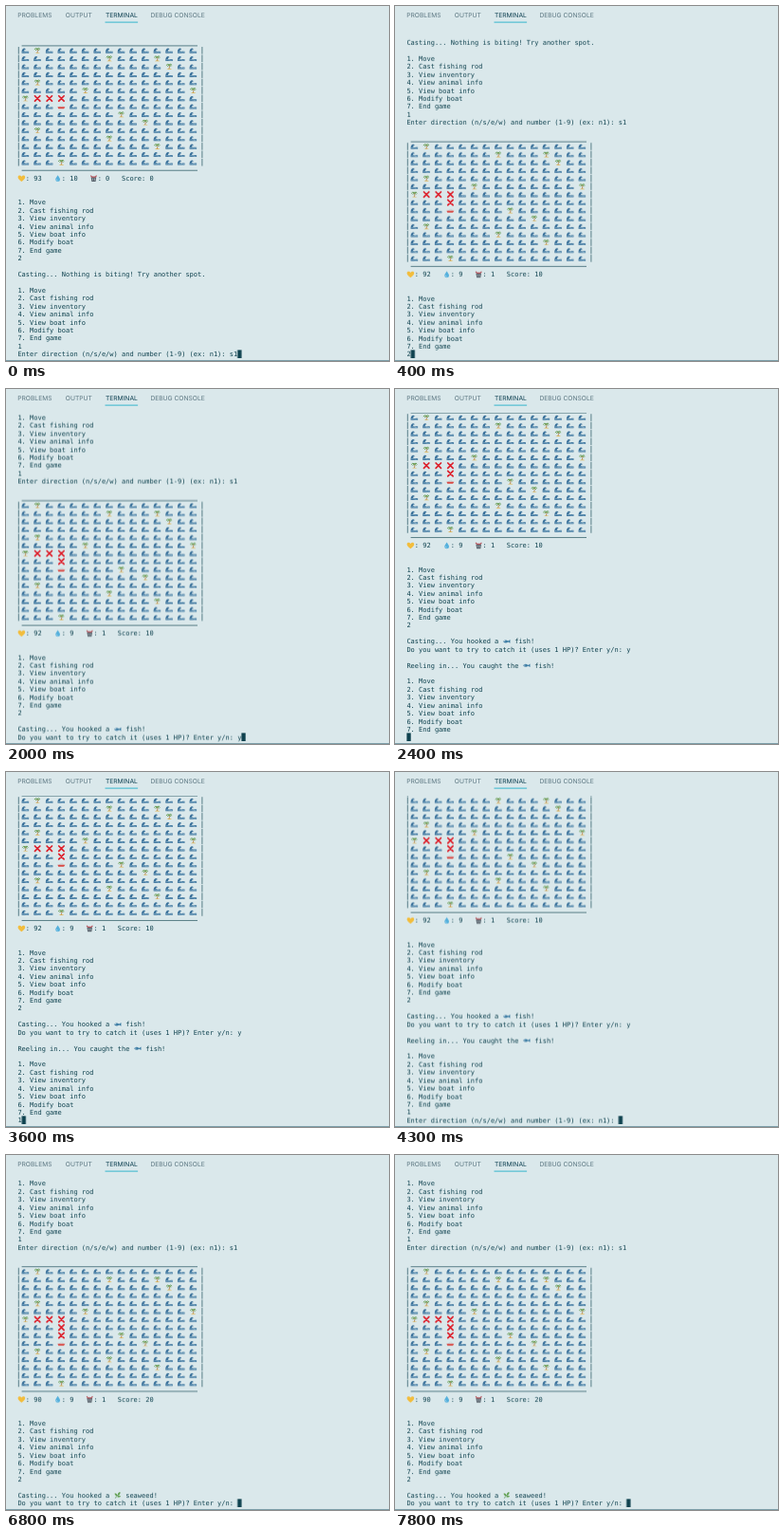
These frames come from a looping animation (404 px wide and 374 px high, 8000 ms). An HTML page:

```html
<!DOCTYPE html>
<html lang="en">
<head>
<meta charset="utf-8">
<title>Fishing game in a terminal</title>
<style>
  html, body { margin: 0; width: 100%; height: 100%; overflow: hidden; background: #dae8eb; }
  svg { display: block; }
  text { white-space: pre; text-rendering: geometricPrecision; }
  .tabs { font: 6.7px Inter, sans-serif; fill: #5c7782; }
  .tabs .on { fill: #0c3f50; }
  .term { font: 7px "DejaVu Sans Mono", monospace; fill: #0f424f; }
  .rule { stroke: #2b5965; stroke-width: .75; fill: none; }
</style>
</head>
<body>
<svg id="stage" width="404" height="374" viewBox="0 0 404 374">
  <defs>
    <clipPath id="view"><rect y="25.6" width="404" height="346"/></clipPath>
    <g id="wave">
      <path d="M.4 7V5.2C.6 3.2 1.5 1.9 3 1.9C4.2 1.9 4.7 2.8 4.1 3.5C3.3 3 2.6 3.8 3 4.6C3.7 5.5 5.8 5.1 7.9 5V7Z" fill="#39709a"/>
      <path d="M1 5.9Q2.5 5.2 4.2 6T7.6 5.8" fill="none" stroke="#a9cfe0" stroke-width=".6"/>
    </g>
    <g id="isle">
      <path d="M1.6 7.2Q4.4 5.4 7.2 7.2Z" fill="#e2b755"/>
      <path d="M4 6.6Q5.1 5 4.3 2.6" fill="none" stroke="#a9773c" stroke-width=".8"/>
      <path d="M4.3 2.5Q2.4 1 1 3.2M4.3 2.5Q6 .8 7.2 3M4.3 2.5Q3 2.8 2.6 4.3M4.3 2.5Q5.8 2.8 6 4.2" fill="none" stroke="#639a4e" stroke-width="1"/>
    </g>
    <path id="cross" d="M1.6 1.6L7 7M7 1.6L1.6 7" stroke="#dd1f2b" stroke-width="1.7" stroke-linecap="round"/>
    <g id="boat">
      <path d="M2.4 4.6L3.6 3.2H5.6L6.2 4.6Z" fill="#f3f5f5" stroke="#90a7b0" stroke-width=".3"/>
      <path d="M.3 4.6H8.2L7 6.6H1.1Z" fill="#d94a45"/>
    </g>
    <path id="heart" d="M4.2 7.6C1.8 5.9.4 4.5.4 2.9C.4 1 3 .6 4.2 2.4C5.4 .6 8 1 8 2.9C8 4.5 6.6 5.9 4.2 7.6Z" fill="#f2bd3d"/>
    <g id="drop">
      <path d="M4.3 .8C5.4 2.8 6.7 4 6.7 5.4A2.4 2.3 0 0 1 1.9 5.4C1.9 4 3.2 2.8 4.3 .8Z" fill="#55b0dc"/>
      <path d="M3.1 5.2Q3.2 6.4 4.2 6.7" fill="none" stroke="#d3eef8" stroke-width=".6"/>
    </g>
    <g id="pail">
      <path d="M1.4 3H7L6.3 7.6H2.1Z" fill="#56606a"/>
      <path d="M1 1.2L2.6 2.8H5.8L7.4 1.2" fill="none" stroke="#b5525a" stroke-width="1.1"/>
      <path d="M3.2 4V6.6M5.2 4V6.6" stroke="#c9d4d8" stroke-width=".6"/>
    </g>
    <g id="fish">
      <path d="M.5 4.3Q3 1.6 5.8 4L7.9 2.5V6.2L5.8 4.9Q3 7 .5 4.3Z" fill="#3f7ea5"/>
      <circle cx="2.2" cy="4" r=".5" fill="#f2f7f8"/>
    </g>
    <g id="weed">
      <path d="M1.4 7.4Q4 5.5 6.4 1.2" fill="none" stroke="#3f7f3c" stroke-width=".7"/>
      <path d="M4 5Q.8 5 1.2 2.2Q4 2.4 4 5ZM4.4 4.6Q4 1.4 6.8 .8Q7.6 3.4 4.4 4.6ZM3.6 5.8Q5.4 3.8 7.6 5.4Q6 7.4 3.6 5.8Z" fill="#5d9e4c"/>
    </g>
  </defs>
  <g class="tabs">
    <text x="12.3" y="12.4">PROBLEMS</text>
    <text x="62.8" y="12.4">OUTPUT</text>
    <text x="104.9" y="12.4" class="on">TERMINAL</text>
    <text x="152.4" y="12.4">DEBUG CONSOLE</text>
    <rect x="104.5" y="16.6" width="34.6" height="1" fill="#35b5cc"/>
  </g>
  <g clip-path="url(#view)"><g id="log" class="term"></g></g>
  <rect id="cursor" x="12.4" y="362.4" width="4.3" height="8.6" fill="#0f424f"/>
  <rect y="373" width="404" height="1" fill="#7c9ea8"/>
</svg>
<script>
const LOOP = 8000, CW = 4.214, LH = 8.42, LEFT = 12.4, LAST = 362.6;
const log = document.getElementById('log');
const cursor = document.getElementById('cursor');
const scroll = [], caret = [];
let row = 0, col = 0;

function add(tag, attrs) {
  const el = document.createElementNS('http://www.w3.org/2000/svg', tag);
  for (const k in attrs) el.setAttribute(k, attrs[k]);
  return log.appendChild(el);
}

const key = (t, props) => ({ offset: t / LOOP, easing: 'step-end', ...props });

function loop(el, keys) {
  const end = { ...keys[keys.length - 1], offset: 1 };
  el.animate([...keys, end], { duration: LOOP, iterations: Infinity });
}

function write(text) {
  const el = add('text', { x: LEFT + col * CW, y: row * LH + 6.7 });
  el.textContent = text;
  col += text.length;
  return el;
}

function icon(id, dx = 0) {
  add('use', { href: '#' + id, x: LEFT + col * CW + dx, y: row * LH });
  col += 2;
}

function newline(n = 1) { row += n; col = 0; }
function line(text) { write(text); newline(); }
function rule(d) { add('path', { d, class: 'rule' }); }

// The current row becomes the bottom row of the view at time t.
function show(t) {
  scroll.push(key(t, { transform: `translate(0px, ${LAST - row * LH}px)` }));
  moveCaret(t);
}
function moveCaret(t) {
  caret.push(key(t, { transform: `translate(${col * CW}px, 0px)` }));
}
function type(ch, t) {
  const el = write(ch);
  loop(el, [key(0, { opacity: 0 }), key(t, { opacity: 1 })]);
  moveCaret(t);
}

// Columns of islands in each row of the sea
const isles = [[1], [7, 11], [12], [], [1], [5, 14], [0], [], [8], [10], [1], [7], [11], [], [3]];

function cell(x, y, boat) {
  if (isles[y].includes(x)) return 'isle';
  if (x === 3 && y === boat) return 'boat';
  if (y === 6 && x > 0 && x < 4) return 'cross';
  if (x === 3 && y > 6 && y < boat) return 'cross';
  return 'wave';
}

function board(boat, hp, water, catches, score) {
  rule(`M16.6 ${row * LH + 7.7}H202`);
  newline();
  for (let y = 0; y < 15; y++) {
    const top = row * LH;
    rule(`M13.3 ${top + .4}v7.6M206.9 ${top + .4}v7.6`);
    for (let x = 0; x < 15; x++) {
      col = 1 + 3 * x;
      icon(cell(x, y, boat), -.4);
    }
    newline();
  }
  rule(`M16.6 ${row * LH + 4.3}H202`);
  newline();
  icon('heart', -.2);
  write(`: ${hp}   `);
  icon('drop');
  write(`: ${water}   `);
  icon('pail');
  write(`: ${catches}   Score: ${score}`);
  newline(3);
}

function menu() {
  ['Move', 'Cast fishing rod', 'View inventory', 'View animal info',
   'View boat info', 'Modify boat', 'End game']
    .forEach((item, i) => line(`${i + 1}. ${item}`));
}

function found(text, id, name) {
  write(text);
  icon(id);
  line(` ${name}!`);
}

const askMove = () => write('Enter direction (n/s/e/w) and number (1-9) (ex: n1): ');
const askCatch = () => write('Do you want to try to catch it (uses 1 HP)? Enter y/n: ');

board(7, 93, 10, 0, 0);
menu();
line('2');
newline();
line('Casting... Nothing is biting! Try another spot.');
newline();
menu();
line('1');
askMove();
write('s1');
show(0);

newline(2);
board(8, 92, 9, 1, 10);
menu();
show(200);
type('2', 400);
newline(2);
found('Casting... You hooked a ', 'fish', 'fish');
askCatch();
show(800);
type('y', 2000);

newline(2);
found('Reeling in... You caught the ', 'fish', 'fish');
newline();
menu();
show(2300);
type('1', 3600);
newline();
askMove();
show(4300);
type('s', 5000);
type('1', 5300);

newline(2);
board(9, 90, 9, 1, 20);
menu();
show(5600);
type('2', 6500);
newline(2);
found('Casting... You hooked a ', 'weed', 'seaweed');
askCatch();
show(6700);

loop(log, scroll);
loop(cursor, caret);
</script>
</body>
</html>
```
